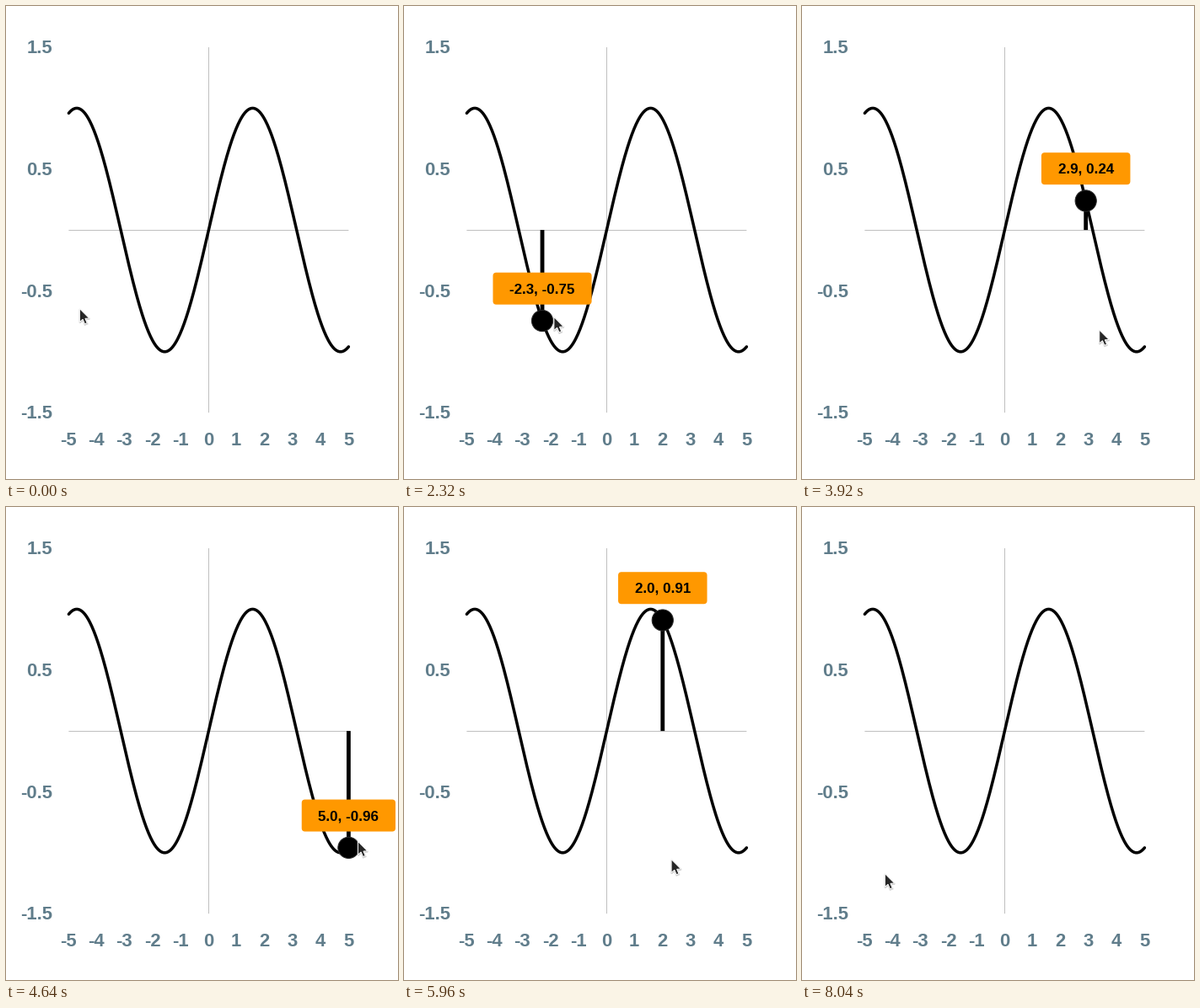
A matplotlib script for the animation above (8120 ms loop, 465x562 px).

```python
import math

import matplotlib.pyplot as plt
import numpy as np
from matplotlib.animation import FuncAnimation
from matplotlib.patches import Circle, FancyBboxPatch, Polygon

WIDTH, HEIGHT, DPI = 465, 562, 64
PT = 72 / DPI                      # points per pixel
INTERVAL, FRAMES = 40, 203
TICK, LAG = 50, 55                 # pointer sampling and marker delay, ms
PRESS, RELEASE = 200, 7950
X0, Y0, XS, YS = 240.4, 266.1, 33.2, 144.7
SLATE, ORANGE, GRID = "#607d8b", "#ff9800", "#bfbfbf"

# Pointer waypoints: time in ms, x in data units, y in pixels
WAYPOINTS = np.array([
    (950, -4.92, 360), (1745, -2.96, 368), (2595, -1.7, 371), (3450, 1.5, 377),
    (4300, 4.3, 393.5), (4620, 5.05, 397.5), (4720, 4.92, 398), (4870, 4.92, 398),
    (5920, 2.0, 419), (6350, 2.0, 419), (6650, -0.32, 427), (7420, -4.54, 442.5),
    (7900, -4.54, 442.5), (8050, -4.59, 436)])


def monotone_curve(t, v):
    """Smooth interpolation without overshoot, at rest on both ends."""
    h = np.diff(t)
    d = np.diff(v) / h
    m = np.zeros_like(v)
    for i in range(1, len(v) - 1):
        if d[i - 1] * d[i] > 0:
            a, b = 2 * h[i] + h[i - 1], h[i] + 2 * h[i - 1]
            m[i] = (a + b) / (a / d[i - 1] + b / d[i])

    def at(time):
        i = int(np.clip(np.searchsorted(t, time, "right") - 1, 0, len(h) - 1))
        u = min(max((time - t[i]) / h[i], 0), 1)
        return ((1 + 2 * u) * (1 - u) ** 2 * v[i] + u * (1 - u) ** 2 * h[i] * m[i]
                + u * u * (3 - 2 * u) * v[i + 1] + u * u * (u - 1) * h[i] * m[i + 1])

    return at


times, *columns = WAYPOINTS.T
pointer_x, pointer_y = (monotone_curve(times, column) for column in columns)


def px(x):
    return X0 + XS * x


def py(y):
    return Y0 - YS * y


plt.rcParams["font.family"] = "Liberation Sans"
fig = plt.figure(figsize=(WIDTH / DPI, HEIGHT / DPI), dpi=DPI, facecolor="white")
ax = fig.add_axes([0, 0, 1, 1])
ax.set_xlim(0, WIDTH)
ax.set_ylim(HEIGHT, 0)
ax.axis("off")


def label(x, y, text, ha="center", size=22, color=SLATE, z=1):
    return ax.text(x, y, text, ha=ha, va="baseline", color=color, zorder=z,
                   fontsize=size * PT, fontweight="bold")


def stroke(xs, ys, width, color="black", cap="butt", z=1):
    return ax.plot(xs, ys, color=color, lw=width * PT, solid_capstyle=cap,
                   snap=False, zorder=z)[0]


for value in (1.5, 0.5, -0.5, -1.5):
    label(55.2, py(value) + 7.2, f"{value}", ha="right")
for value in range(-5, 6):
    label(px(value) - 0.4, 522, f"{value}")

stroke([px(-5), px(5)], [266.5, 266.5], 1, GRID)
stroke([240.5, 240.5], [py(1.5), py(-1.5)], 1, GRID)
xs = np.linspace(-5, 5, 401)
stroke(px(xs), py(np.sin(xs)), 3.5, cap="round", z=2)

stem = stroke([], [], 4.8, z=3)
dot = ax.add_patch(Circle((0, 0), 12.6, fc="black", ec="#2b2b2b", lw=PT, zorder=4))
tip = ax.add_patch(FancyBboxPatch((0, 0), 105, 38, fc=ORANGE, ec="none", zorder=5,
                                  boxstyle="round,pad=0,rounding_size=4"))
tip_text = label(0, 0, "", size=17, color="black", z=6)
marker = (stem, dot, tip, tip_text)

ARROW = np.array([(0.3, 0), (0.3, 16), (4, 12.8), (6.4, 18.3), (9.2, 17.2),
                  (6.9, 11.8), (11.8, 11.6)])
shadow = ax.add_patch(Polygon(ARROW, fc="black", ec="black", lw=2 * PT, alpha=0.16, zorder=7))
cursor = ax.add_patch(Polygon(ARROW, fc="#262626", ec="white", lw=PT, zorder=8))


def draw(frame):
    # The pointer is sampled every 50 ms and shown on a 40 ms grid
    time = TICK * (math.ceil((frame + 0.5) * INTERVAL / TICK) - 1)

    place = np.array([px(pointer_x(time)) + 10, pointer_y(time) - 0.5])
    cursor.set_xy(ARROW + place)
    shadow.set_xy(ARROW + place + (0.2, 0.9))

    pressed = PRESS <= time < RELEASE
    for artist in marker:
        artist.set_visible(pressed)
    if pressed:
        x = round(float(np.clip(pointer_x(time - LAG), -5, 5)), 1) + 0.0
        y = math.sin(x)
        cx, cy = px(x), py(y)
        text = f"{x:.1f}, {y:.2f}"
        width = 105.5 + 5.8 * text.count("-")
        stem.set_data([cx, cx], [Y0, cy])
        dot.center = cx, cy
        tip.set_bounds(cx - width / 2, cy - 57.3, width, 38)
        tip_text.set_position((cx, cy - 32.7))
        tip_text.set_text(text)
    return (*marker, shadow, cursor)


anim = FuncAnimation(fig, draw, frames=FRAMES, interval=INTERVAL, repeat=True,
                     repeat_delay=0, blit=False)
plt.show()
```
